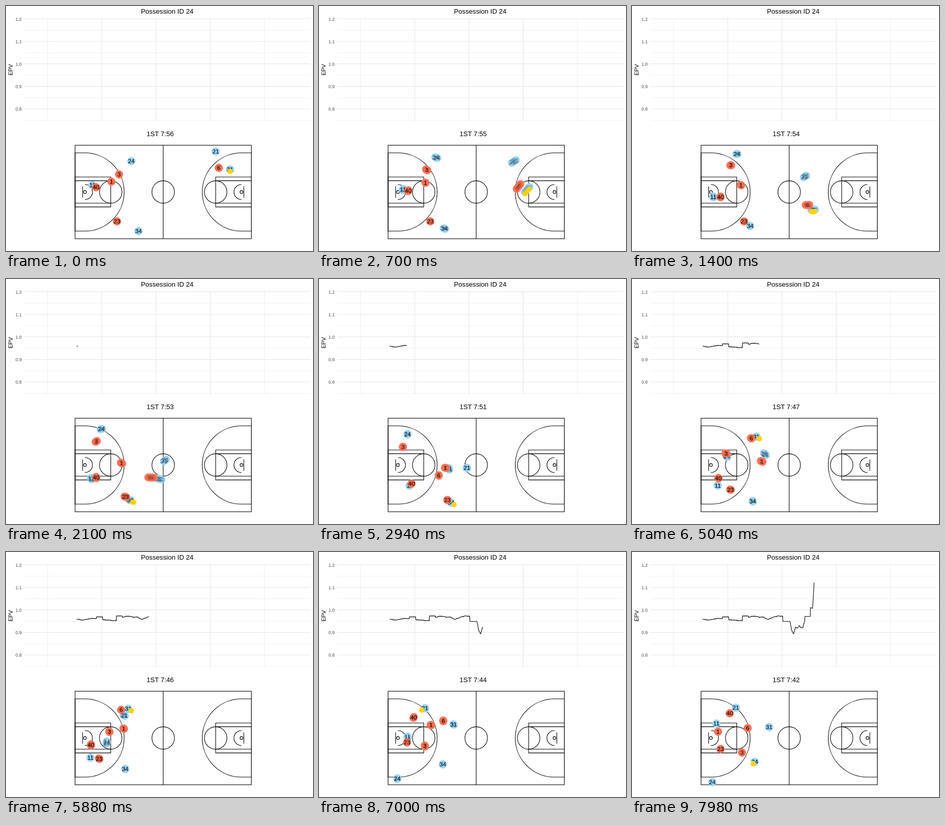
An HTML page with a canvas for the animation above (8000 ms loop, 600 by 480 pixels).

```html
<!DOCTYPE html>
<html lang="en">
<head>
<meta charset="utf-8">
<title>Possession chart</title>
<style>
  html, body { margin: 0; width: 100%; height: 100%; overflow: hidden; background: #fff; }
  svg, canvas { position: absolute; left: 0; top: 0; width: 600px; height: 480px; }
  text { font-family: "Liberation Sans", Arial, sans-serif; }
  .head { font-size: 13.2px; text-anchor: middle; }
  .tick { font-size: 8.8px; text-anchor: end; fill: #4d4d4d; }
  .axis { font-size: 11px; text-anchor: middle; }
  .court { fill: none; stroke: #000; stroke-width: 1.1; }
</style>
</head>
<body>
<svg viewBox="0 0 600 480">
  <defs>
    <g id="half">
      <path d="M135 287.8H154.3A76.6 76.6 0 0 1 154.3 441H135Z"/>
      <path d="M135 335H204.7V393.6H135ZM135 342.4H204.7M135 386.3H204.7"/>
      <circle cx="204.7" cy="364.4" r="22"/>
      <path d="M149.7 353.4V375.4M154.3 349.7A14.7 14.7 0 0 1 154.3 379.1"/>
      <circle cx="154.3" cy="364.4" r="2.8"/>
    </g>
  </defs>
  <g id="grid"></g>
  <text class="head" x="315" y="15">Possession ID 24</text>
  <text class="axis" transform="translate(12.8 125) rotate(-90)">EPV</text>
  <text class="head" id="clock" x="301.3" y="255">1ST 7:56</text>
  <g class="court">
    <rect x="135" y="272.8" width="344.5" height="183.2"/>
    <path d="M307.2 272.8V456"/>
    <circle cx="307.2" cy="364.4" r="22"/>
    <use href="#half"/>
    <use href="#half" transform="translate(614.5 0) scale(-1 1)"/>
  </g>
</svg>
<canvas id="play" width="600" height="480"></canvas>
<script>
const LOOP = 8000, STEP = 140, SAMPLES = 6;
const BLUE = '#99d5fb', RED = '#ff7255', GOLD = '#ffd30a';

// Where each player stands on the shared beats (in steps)
const BEATS = [0, 10, 21, 30, 42, 50, 57];
const blue = {
  24: [[245, 304], [205, 290], [173, 304], [173, 328], [197, 373], [153, 444], [157, 451]],
  11: [[169, 351], [159, 374], [177, 405], [172, 405], [165, 403], [173, 363], [165, 336]],
  34: [[259, 441], [231, 431], [258, 438], [242, 442], [233, 425], [242, 416], [240, 411]],
  21: [[410, 285], [338, 334], [289, 370], [282, 363], [231, 320], [207, 306], [203, 305]],
  31: [[438, 320], [354, 399], [254, 372], [249, 314], [239, 307], [263, 338], [268, 343]]
};
const red = {
  3: [[221, 330], [193, 312], [164, 329], [167, 335], [202, 352], [207, 380], [215, 393]],
  1: [[206, 344], [213, 351], [247, 370], [271, 367], [230, 346], [219, 339], [168, 352]],
  40: [[176, 355], [173, 374], [181, 401], [174, 397], [166, 378], [185, 324], [191, 316]],
  23: [[217, 422], [219, 422], [251, 433], [207, 419], [182, 405], [172, 373], [173, 386]],
  6: [[416, 317], [343, 390], [234, 385], [241, 320], [225, 309], [243, 331], [226, 345]]
};

// Who has the ball and on which side; EPV runs through the levels, then stays at `pass` in flight
const plays = [
  { id: 31, from: 0, to: 12.5, side: 0 },
  { id: 34, from: 14.5, to: 22, side: 1, levels: [.96, .957, .955, .959, .961, .963, .961], pass: .969 },
  { id: 21, from: 24.5, to: 29.6, side: 0, levels: [.957, .954, .952], pass: .973 },
  { id: 31, from: 32, to: 45, side: 1, levels: [.966, .972, .971, .967, .968, .957, .964, .97, .973, .971], pass: .949 },
  { id: 21, from: 47.8, to: 53.4, side: -1, levels: [.949, .906, .894, .924, .919, .93, .92, .922, .95], pass: .971 },
  { id: 34, from: 55.6, to: 58, side: -.5, levels: [1.01, 1.007, 1.158, 1.158] }
];
const EPV_START = plays[1].from;

const mix = (a, b, u) => a + (b - a) * u;
const noise = n => { const v = Math.sin(n * 12.9898) * 43758.5453; return v - Math.floor(v) - 0.5; };

function drawGrid() {
  let out = '';
  const line = (d, width) => { out += `<path d="${d}" stroke="#e6e6e6" stroke-width="${width}"/>`; };
  for (let i = 0; i < 5; i++) {
    const y = 25 + 44.2 * i, x = 81.3 + 105.95 * i;
    line(`M36 ${y}H595`, 1.1);
    line(`M36 ${y + 22.3}H595`, 0.6);
    line(`M${x} 24V226`, i % 4 ? 1.1 : 0.7);
    out += `<text class="tick" x="30.7" y="${y + 3.6}">${(1.2 - i / 10).toFixed(1)}</text>`;
  }
  document.getElementById('grid').innerHTML = out;
}

// Smooth path without overshoot, at rest at both ends
function at(path, s) {
  const last = BEATS.length - 1;
  s = Math.min(Math.max(s, 0), BEATS[last]);
  const i = Math.min(BEATS.findLastIndex(b => b <= s), last - 1);
  const span = BEATS[i + 1] - BEATS[i], u = (s - BEATS[i]) / span;
  return [0, 1].map(c => {
    const slope = n => (path[n + 1][c] - path[n][c]) / (BEATS[n + 1] - BEATS[n]);
    const tangent = n => {
      if (n === 0 || n === last) return 0;
      const a = slope(n - 1), b = slope(n);
      return a * b > 0 ? 2 * a * b / (a + b) : 0;
    };
    const d = slope(i) * span, m0 = tangent(i) * span, m1 = tangent(i + 1) * span;
    return path[i][c] + u * (m0 + u * (3 * d - 2 * m0 - m1 + u * (m0 + m1 - 2 * d)));
  });
}

const playAt = s => plays.findLast(p => p.from <= Math.max(s, 0));

function held(play, s) {
  const [x, y] = at(blue[play.id], s);
  return [x + 6 * play.side, y + 4];
}

function ballAt(s) {
  const play = playAt(s);
  if (s <= play.to) return held(play, s);
  const next = plays[plays.indexOf(play) + 1];
  const a = held(play, play.to), b = held(next, next.from);
  const u = (s - play.to) / (next.from - play.to);
  return [mix(a[0], b[0], u), mix(a[1], b[1], u)];
}

function epvAt(s) {
  const { from, to, levels, pass } = playAt(s);
  if (s > to) return pass;
  const f = (s - from) / (to - from) * (levels.length - 1);
  const i = Math.min(Math.floor(f), levels.length - 2);
  return mix(levels[i], levels[i + 1], f - i) + 0.003 * noise(Math.floor(s * 4));
}

const ctx = document.getElementById('play').getContext('2d');
const clock = document.getElementById('clock');

// Each picture blends several moments around step k
const trail = (place, k) => Array.from({ length: SAMPLES }, (_, j) =>
  place(k + (j - (SAMPLES - 1) / 2) / SAMPLES));

function discs(points, r, color) {
  ctx.fillStyle = color;
  for (const [x, y] of points) {
    ctx.beginPath();
    ctx.arc(x, y, r, 0, 7);
    ctx.fill();
  }
}

function drawTeam(team, color, k) {
  const trails = Object.entries(team).map(([id, path]) => [id, trail(s => at(path, s), k)]);
  for (const [, points] of trails) discs(points, 7.6, color);
  ctx.fillStyle = 'rgba(0,0,0,.3)';
  for (const [id, points] of trails)
    for (const [x, y] of points) ctx.fillText(id, x, y + 4.1);
}

function drawCurve(k) {
  ctx.beginPath();
  for (let n = EPV_START * 10; n <= k * 10; n++) {
    const s = n / 10;
    ctx.lineTo(171.3 + (s - 21) * 5.13, 113.4 - (epvAt(s) - 1) * 442);
  }
  ctx.lineWidth = 1.1;
  ctx.lineJoin = 'round';
  ctx.stroke();
}

let shown = -1;
function tick() {
  const k = Math.floor(performance.now() % LOOP / STEP);
  if (k !== shown) {
    shown = k;
    ctx.clearRect(0, 0, 600, 480);
    ctx.font = '11.5px "Liberation Sans", Arial, sans-serif';
    ctx.textAlign = 'center';
    drawCurve(k);
    drawTeam(blue, BLUE, k);
    drawTeam(red, RED, k);
    discs(trail(ballAt, k), 4.8, GOLD);
    clock.textContent = '1ST 7:' + Math.floor(56.7 - k * 0.245);
  }
  requestAnimationFrame(tick);
}

drawGrid();
tick();
</script>
</body>
</html>
```
